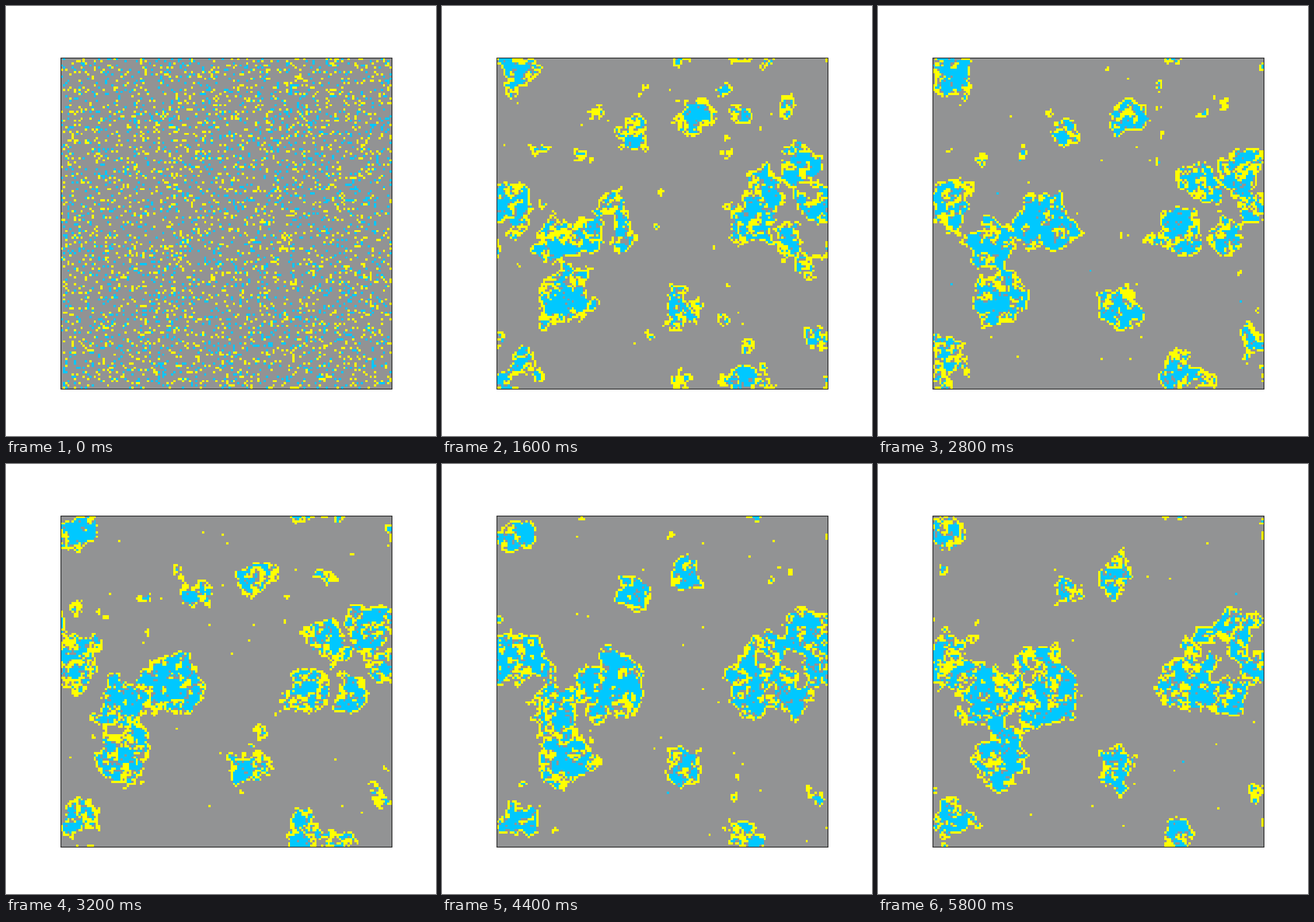
Write a matplotlib script that moves like this. It is 748 px wide and 748 px high and loops after 6000 ms.

```python
import numpy as np
import matplotlib.pyplot as plt
from matplotlib.animation import FuncAnimation
from matplotlib.colors import ListedColormap

STAGE, DPI = 748, 100
N = 150
SLOTS, INTERVAL = 30, 200
STEPS = SLOTS - 2
GREY, YELLOW, CYAN = range(3)
COLORS = ["#929394", "#ffff00", "#00c8ff"]

# Places where cells gather on the torus: column, row, radius in cells.
COLONIES = [
    (7, 6, 8), (7, 66, 12), (50, 77, 14), (26, 83, 11),
    (30, 109, 11), (86, 27, 8), (60, 35, 6), (114, 76, 12),
    (131, 81, 9), (138, 51, 10), (121, 57, 8), (83, 113, 8),
    (112, 143, 8), (8, 138, 9), (146, 129, 5), (146, 68, 7),
]
MEAN_RADIUS = 8
FILL = 0.23                                   # share of the dish under colonies
MEMORY = np.array([0.85, 0.5, 0.7, 0.3])      # how slowly each noise field turns over

rng = np.random.default_rng(12)
ROWS, COLS = np.mgrid[:N, :N]
freq = np.fft.fftfreq(N)
FREQ2 = freq[:, None] ** 2 + freq ** 2


def normal(a):
    return (a - a.mean()) / a.std()


def smooth(field, sigma):
    """Periodic Gaussian blur with zero mean and unit spread."""
    kernel = np.exp(-2 * (np.pi * sigma) ** 2 * FREQ2)
    return normal(np.fft.ifft2(np.fft.fft2(field) * kernel).real)


def wrap(d):
    return (d + N / 2) % N - N / 2


def pull(k):
    """Signed distance to the colonies; large ones ripen as small ones shrink."""
    ripe = 0.5 * (2 * k / STEPS - 1)
    depth = np.full((N, N), -5.5)
    for col, row, radius in COLONIES:
        r = radius + ripe * (radius - MEAN_RADIUS)
        dist = np.hypot(wrap(COLS - col), wrap(ROWS - row))
        depth = np.maximum(depth, r - dist)
    return np.minimum(depth, 6)


def interior(mask):
    out = mask.copy()
    for axis in (0, 1):
        for shift in (-1, 1):
            out &= np.roll(mask, shift, axis)
    return out


def sort_cells(k, fields):
    wide, rough, core, lace = fields
    settled = 1 - np.exp(-k / 2.5)
    ragged = 2 + 2 * np.exp(-k / 6)
    depth = (settled * pull(k) + ragged * smooth(wide, 0.8 + 2.2 * settled)
             + smooth(rough, 1.1))
    depth -= np.quantile(depth, 1 - FILL)

    body = depth > 0
    inner = interior(body)
    rim = body & ~inner
    fine = smooth(lace, 0.4)
    heart = inner & (smooth(core, 1.3) + 0.35 * np.clip(depth, 0, 3) > 0.95)
    mesh = inner & ~heart

    grid = np.full((N, N), GREY)
    grid[rim & (fine > -0.8)] = YELLOW
    grid[mesh & (fine > -0.1)] = YELLOW
    grid[mesh & (fine < -0.9)] = CYAN
    grid[heart & (fine < 1.5)] = CYAN

    stray = rng.random((N, N))
    rate = 0.0008 + 0.06 * np.exp(-1.3 * k)
    grid[~body & (stray < rate)] = YELLOW
    grid[~body & (stray > 1 - rate / 10)] = CYAN
    return grid


def simulate():
    u = rng.random((N, N))
    start = np.where(u < 0.1, YELLOW, np.where(u > 0.905, CYAN, GREY))
    fields = rng.standard_normal((4, N, N))
    fields[0] = normal(start > 0)
    keep = MEMORY[:, None, None]
    grids = [start]
    for k in range(1, STEPS + 1):
        grids.append(sort_cells(k, fields))
        fresh = rng.standard_normal(fields.shape)
        fields = keep * fields + np.sqrt(1 - keep ** 2) * fresh
    return grids


grids = simulate()

fig, ax = plt.subplots(figsize=(STAGE / DPI, STAGE / DPI), dpi=DPI)
image = ax.imshow(grids[0], cmap=ListedColormap(COLORS), vmin=0, vmax=2,
                  interpolation="nearest")
ax.set(xticks=[], yticks=[])


def draw(slot):
    image.set_data(grids[max(0, slot - 1)])
    return [image]


anim = FuncAnimation(fig, draw, frames=SLOTS, interval=INTERVAL,
                     repeat=True, repeat_delay=0)
plt.show()
```
